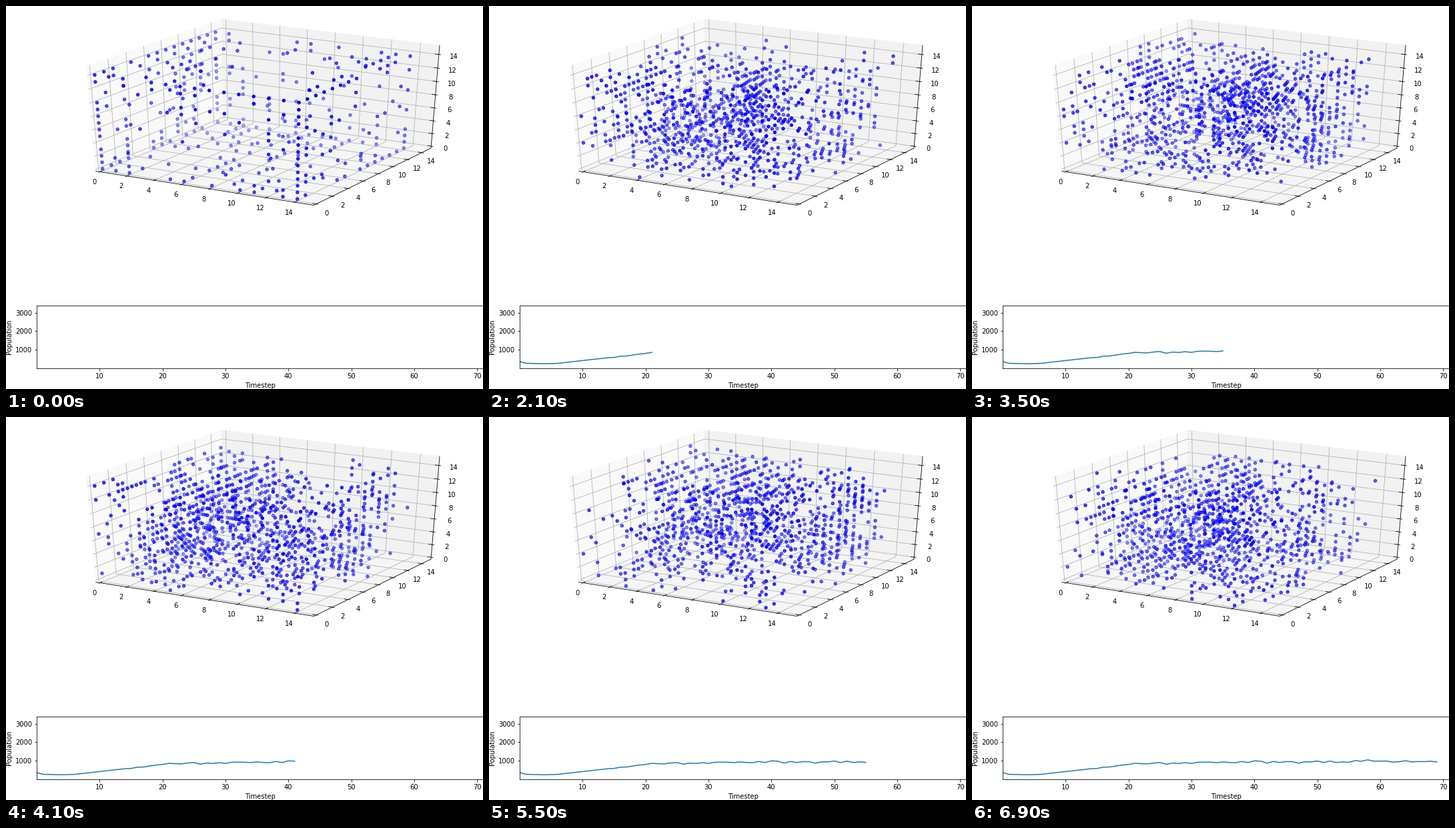
A matplotlib script that plays this animation: 715x574 px, repeating every 7 s.

```python
import numpy as np
import matplotlib.pyplot as plt
from matplotlib.animation import FuncAnimation

W, H, DPI = 715, 574, 72
STEPS, GRID, SPAN = 70, 15, 15.0
LO, HI = -SPAN / 48, SPAN * 49 / 48      # panes reach slightly past the limits

plt.rcParams.update({"font.family": "DejaVu Sans", "font.size": 10})

# Population: a dip, steady growth, then a plateau with jitter
steps = np.arange(STEPS)
trend = np.interp(steps, [0, 1, 4, 6, 14, 20, 35], [370, 275, 250, 270, 575, 835, 955])
jitter = np.random.default_rng(5).normal(0, 40, STEPS)
POPULATION = (trend + jitter * np.clip((steps - 13) / 5, 0, 1)).astype(int)

# Perspective camera: elevation 30, azimuth -60, distance 10
ELEV, AZIM, DIST = np.radians(30), np.radians(-60), 10
CE, SE, CA, SA = np.cos(ELEV), np.sin(ELEV), np.cos(AZIM), np.sin(AZIM)
RIGHT = np.array([-SA, CA, 0])
UP = np.array([-CA * SE, -SA * SE, CE])
TOWARD = np.array([CA * CE, SA * CE, SE])


def project(points):
    """Stage x, stage y and distance from the eye for data points."""
    p = np.asarray(points, float) / SPAN - 0.5
    depth = DIST - p @ TOWARD
    x = 389.9 + 3621 * (p @ RIGHT) / depth
    y = 154.2 - 1725 * (p @ UP) / depth
    return x, y, depth


fig = plt.figure(figsize=(W / DPI, H / DPI), dpi=DPI, facecolor="white")
stage = fig.add_axes([0, 0, 1, 1])
stage.set(xlim=(0, W), ylim=(H, 0))
stage.axis("off")


def draw_path(points, color, zorder):
    x, y, _ = project(points)
    stage.plot(x, y, color=color, lw=0.8, zorder=zorder)


def draw_pane(points, shade):
    x, y, _ = project(points)
    stage.fill(x, y, fc=str(shade), ec=str(shade), lw=1, zorder=0)


def draw_tick(value, axis):
    """Grid line, tick mark and label of one value on one axis."""
    inner, outer, pad = 0.25, 0.125, 0.698
    if axis == "x":
        grid = [(value, LO, LO), (value, HI, LO), (value, HI, HI)]
        mark = [(value, LO + inner, LO), (value, LO - outer, LO)]
        label = (value, LO - pad, LO - pad)
    elif axis == "y":
        grid = [(HI, value, LO), (LO, value, LO), (LO, value, HI)]
        mark = [(HI - inner, value, LO), (HI + outer, value, LO)]
        label = (HI + pad, value, LO - pad)
    else:
        grid = [(LO, LO, value), (LO, HI, value), (HI, HI, value)]
        mark = [(HI - inner, HI, value), (HI + outer, HI, value)]
        label = (HI + pad, HI + pad, value)
    draw_path(grid, "#b0b0b0", 1)
    draw_path(mark, "black", 2)
    x, y, _ = project(label)
    stage.text(x, y, str(value), ha="center", va="top")


draw_pane([(LO, LO, LO), (LO, HI, LO), (LO, HI, HI), (LO, LO, HI)], 0.975)
draw_pane([(LO, HI, LO), (HI, HI, LO), (HI, HI, HI), (LO, HI, HI)], 0.95)
draw_pane([(LO, LO, LO), (HI, LO, LO), (HI, HI, LO), (LO, HI, LO)], 0.9625)
for axis in "xyz":
    for value in range(0, GRID, 2):
        draw_tick(value, axis)
draw_path([(LO, LO, LO), (HI, LO, LO), (HI, HI, LO), (HI, HI, HI)], "black", 2)
dots = stage.scatter([], [], s=20, lw=1, zorder=3)

chart = fig.add_axes([45.9 / W, 30.85 / H, 669.9 / W, 94 / H])
chart.set(xlim=(0, 71), ylim=(0, GRID ** 3), xlabel="Timestep",
          ylabel="Population", xticks=range(10, 71, 10),
          yticks=range(1000, 3001, 1000))
curve, = chart.plot([], [], color="#1f77b4", lw=1.5)

# Living cells: faint drifting clumps plus fresh noise, the outer shell first
CELLS = np.indices((GRID,) * 3).reshape(3, -1).T
FACES = ((CELLS == 0) | (CELLS == GRID - 1)).sum(axis=1)
waves = np.random.default_rng(8)
FREQ = waves.normal(0, 0.7, (12, 3))
PHASE = waves.uniform(0, 2 * np.pi, 12)
DRIFT = waves.uniform(-0.8, 0.8, 12)


def living_cells(step):
    rng = np.random.default_rng(100 + step)
    clumps = np.cos(CELLS @ FREQ.T + PHASE + DRIFT * step).sum(axis=1) / 6
    shell = (1.6 * np.exp(-step / 5) - 0.35) * FACES
    score = clumps + shell + rng.normal(0, 0.8, len(CELLS))
    return CELLS[np.sort(np.argsort(-score)[:POPULATION[step]])]


def update(step):
    x, y, depth = project(living_cells(step))
    far = -1 / depth
    far = (far - far.min()) / (far.max() - far.min())
    colors = np.zeros((len(x), 4))
    colors[:, 2] = 1
    colors[:, 3] = 1 - 0.7 * far
    dots.set_offsets(np.column_stack([x, y]))
    dots.set_facecolor(colors)
    dots.set_edgecolor(colors)
    curve.set_data(steps[:step + 1], POPULATION[:step + 1])
    return dots, curve


anim = FuncAnimation(fig, update, frames=STEPS, interval=100, repeat=True,
                     repeat_delay=0)
plt.show()
```
